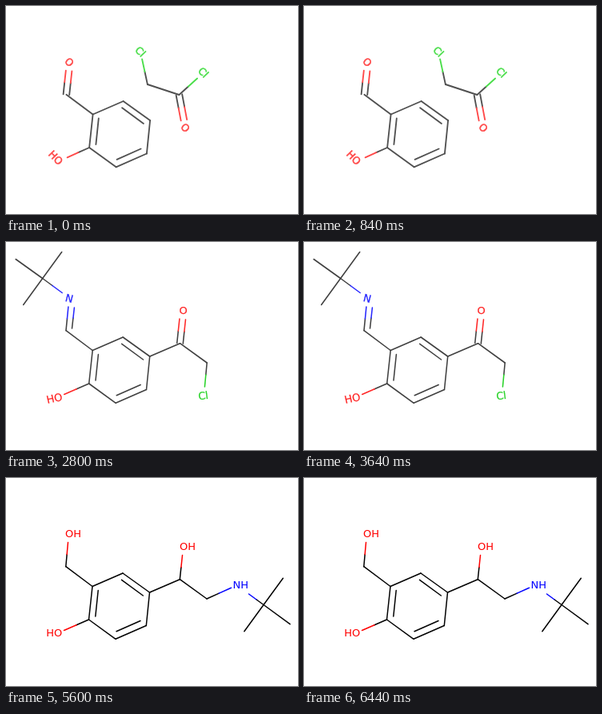
An HTML page that plays this animation: 365 by 260 pixels, repeating every 7000 ms.

```html
<!DOCTYPE html>
<html lang="en">
<head>
<meta charset="utf-8">
<title>Synthesis steps</title>
<style>
html, body { margin: 0; width: 100%; height: 100%; overflow: hidden; background: #fff; }
svg { display: block; width: 365px; height: 260px; }
line { stroke-linecap: round; }
text { font-family: "DejaVu Sans", sans-serif; text-anchor: middle; }
</style>
</head>
<body>
<svg id="stage" viewBox="0 0 365 260"></svg>
<script>
const STEP = 1400;
const soft = { c: '#505050', o: '#ff4848', n: '#4848ff', cl: '#4ade4a', width: 1.85, weight: .6, size: 12.5, tilt: 46, shift: .6 };
const thin = { c: '#404040', o: '#ff2828', n: '#2828ff', cl: '#28d328', width: 1.55, weight: .25, size: 13, tilt: 0, shift: .2 };
const crisp = { c: '#000', o: '#f00', n: '#00f', cl: '#0c0', width: 1.5, weight: 0, size: 13, tilt: 0, shift: 0 };

const ring = [[108, 135.5], [146, 119], [179.5, 143], [175.3, 184.5], [137, 201.3], [103.5, 177]];
const formyl = [74.8, 110.7], carbonyl = [217.3, 126.7], methylene = [251, 151];

function painter(style) {
  let out = '';
  const line = (a, b, kind = 'c') => {
    out += `<line x1="${a[0]}" y1="${a[1]}" x2="${b[0]}" y2="${b[1]}" stroke="${style[kind]}" stroke-width="${style.width}"/>`;
  };
  // Second half takes the colour of the hetero atom.
  const bond = (a, b, kind = 'c') => {
    const mid = [(a[0] + b[0]) / 2, (a[1] + b[1]) / 2];
    line(a, mid);
    line(mid, b, kind);
  };
  const double = (a, b, kind) => {
    const dx = b[0] - a[0], dy = b[1] - a[1], k = 3.8 / Math.hypot(dx, dy);
    for (const s of [-k, k])
      bond([a[0] - dy * s, a[1] + dx * s], [b[0] - dy * s, b[1] + dx * s], kind);
  };
  const label = (text, x, y, kind, tilt = style.tilt, size = style.size) => {
    out += `<text transform="translate(${x} ${y}) rotate(${tilt})" y="${size * .365}" font-size="${size}" fill="${style[kind]}" stroke="${style[kind]}" stroke-width="${style.weight}">${text}</text>`;
  };
  const star = (center, ends) => ends.forEach(end => line(center, end));
  const html = () => `<g transform="translate(${style.shift} 0)">${out}</g>`;
  return { line, bond, double, label, star, html };
}

function phenol(p, end, x, y, tilt) {
  ring.forEach((a, i) => p.line(a, ring[(i + 1) % 6]));
  p.line([144.5, 127.3], [171.3, 147]);
  p.line([168, 178.5], [138, 191.8]);
  p.line([111.8, 173], [115.2, 140.5]);
  p.line(ring[0], formyl);
  p.bond(ring[5], end, 'o');
  p.label('HO', x, y, 'o', tilt);
}

function aldehyde(p) {
  p.double(formyl, [78, 81], 'o');
  p.label('O', 78.6, 70, 'o');
}

function ketone(p) {
  p.line(ring[2], carbonyl);
  p.double(carbonyl, [220.5, 96.5], 'o');
  p.label('O', 221.4, 85.7, 'o');
  p.line(carbonyl, methylene);
}

const scenes = [
  [soft, p => {
    const alpha = [176.3, 98], acyl = [215.8, 111];
    phenol(p, [76, 189.3], 61.6, 189.5);
    aldehyde(p);
    p.line(alpha, acyl);
    p.bond(alpha, [169.5, 66.5], 'cl');
    p.bond(acyl, [238.5, 90.5], 'cl');
    p.double(acyl, [221.8, 142.7], 'o');
    p.label('Cl', 167.5, 57, 'cl');
    p.label('Cl', 246.1, 83, 'cl');
    p.label('O', 223.5, 152, 'o');
  }],
  [soft, p => {
    phenol(p, [76, 189.3], 61.5, 189.5);
    aldehyde(p);
    ketone(p);
    p.bond(methylene, [278.5, 139], 'cl');
    p.label('Cl', 288.5, 134, 'cl');
  }],
  [thin, p => {
    const center = [45.5, 45.5];
    phenol(p, [72.5, 190.5], 60.3, 195.2, -13);
    p.bond(formyl, [77.7, 81], 'n');
    p.bond([82.3, 108], [85.2, 82], 'n');
    p.label('N', 78.8, 70.3, 'n', 14);
    p.bond(center, [70, 63.5], 'n');
    p.star(center, [[12, 21.5], [69.5, 12.5], [21.5, 78.5]]);
    ketone(p);
    p.bond(methylene, [248.2, 181], 'cl');
    p.label('Cl', 246.3, 192, 'cl', -8);
  }],
  [thin, p => {
    const center = [280, 216];
    phenol(p, [72.5, 190.5], 60.3, 194.5);
    aldehyde(p);
    ketone(p);
    p.label('Cl', 130.7, 40.3, 'cl');
    p.label('-', 138.3, 36, 'cl', 0, 8.5);
    p.bond(methylene, [247.7, 181.5], 'n');
    p.label('NH', 252, 195.5, 'n');
    p.label('2', 265.2, 199, 'n', 0, 9);
    p.label('+', 272, 188.5, 'n', 0, 10);
    p.bond(center, [259.5, 201.3], 'n');
    p.star(center, [[304, 183], [313, 240], [255.7, 249.3]]);
  }],
  [crisp, p => {
    const center = [322, 158.5];
    phenol(p, [72.5, 190.5], 60.3, 193);
    p.bond(formyl, [77.5, 80.5], 'o');
    p.label('OH', 84, 69.3, 'o');
    p.line(ring[2], carbonyl);
    p.bond(carbonyl, [220.5, 96.5], 'o');
    p.label('OH', 227, 85, 'o');
    p.line(carbonyl, methylene);
    p.bond(methylene, [281.5, 137.3], 'n');
    p.label('NH', 293.3, 133.5, 'n');
    p.bond(center, [303.5, 145], 'n');
    p.star(center, [[346.3, 125.3], [355, 182.7], [297.8, 191.7]]);
  }]
].map(([style, draw]) => {
  const p = painter(style);
  draw(p);
  return p.html();
});

const stage = document.getElementById('stage');
let shown = -1;
function render(time) {
  const index = Math.floor(time / STEP) % scenes.length;
  if (index !== shown) stage.innerHTML = scenes[shown = index];
}

const start = performance.now();
function tick() {
  render(performance.now() - start);
  requestAnimationFrame(tick);
}
tick();
</script>
</body>
</html>
```
